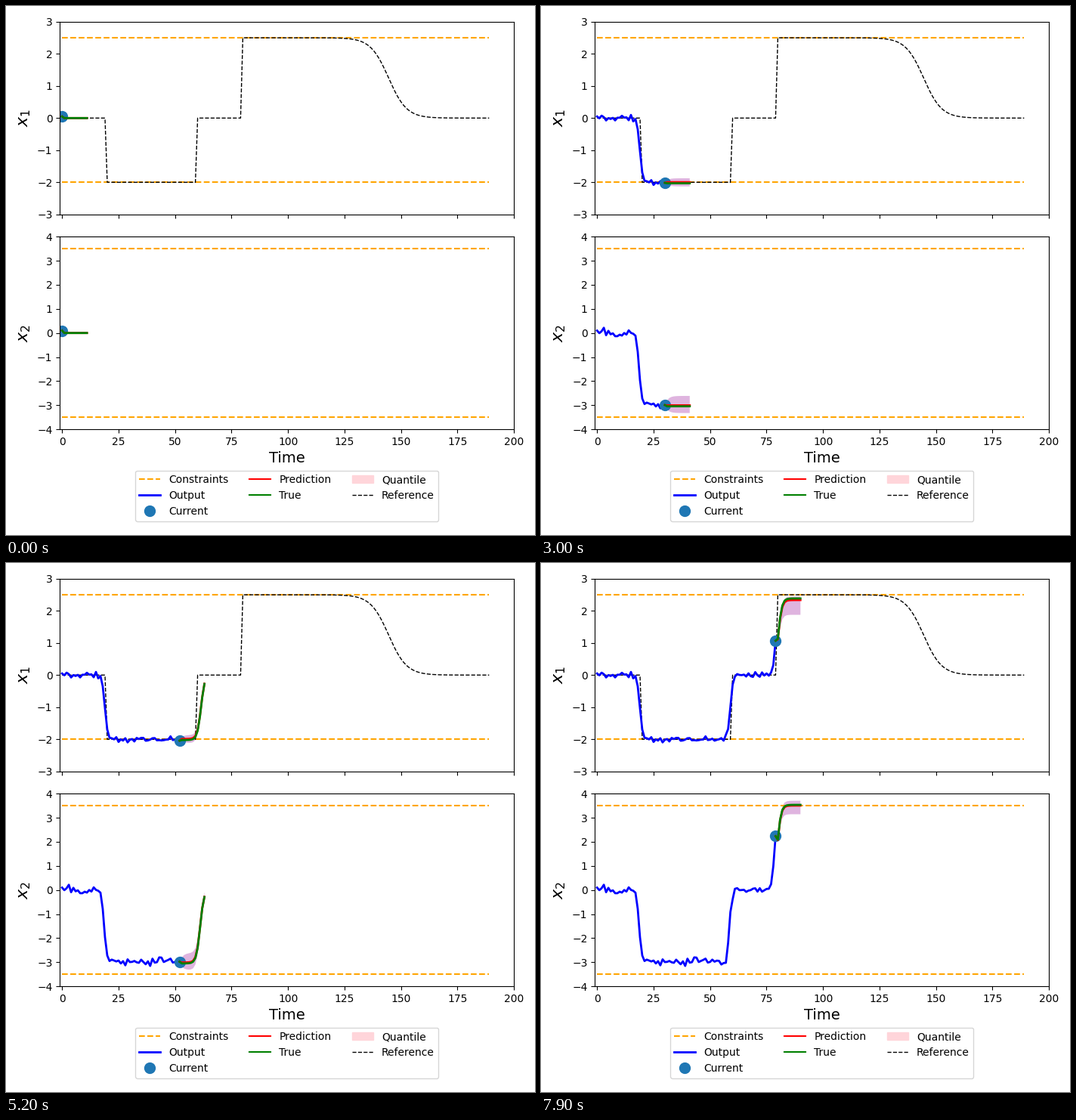
Animation of 700x700 px, one loop 8000 ms. Source, as a matplotlib script:

```python
import numpy as np
import matplotlib.pyplot as plt
from matplotlib.animation import FuncAnimation
from matplotlib.lines import Line2D
from matplotlib.patches import Patch, Polygon

SIZE, DPI = 700, 100
STEPS, HORIZON = 80, 12
SWITCH = (20, 60, 80)          # times at which the set point jumps

plt.rcParams["font.family"] = "DejaVu Sans"
rng = np.random.default_rng(4)


def logistic(v):
    return 1 / (1 + np.exp(-v))


def reference(t):
    fall = 2.5 * logistic(0.25 * (144.5 - t))
    return np.select([t < 20, t < 60, t < 80], [0, -2, 0], fall)


class Panel:
    def __init__(self, fig, top, limits, ylim, label, levels, lead, noise,
                 start, bias, below, above):
        self.levels, self.lead = levels, lead
        self.bias, self.below, self.above = bias, below, above

        # measured output: soft steps just ahead of each switch, plus noise
        t = np.arange(STEPS)
        self.noise = rng.normal(0, noise, STEPS)
        self.noise[0] = start
        self.out = self.noise + sum(
            jump * logistic(1.6 * (t - s + 1 + lead))
            for s, jump in zip(SWITCH, np.diff(levels)))

        ax = self.ax = fig.add_axes([71.2 / SIZE, 1 - (top + 255) / SIZE,
                                     601 / SIZE, 255 / SIZE])
        ax.set(xlim=(-1, 200), ylim=(-ylim, ylim),
               xticks=range(0, 201, 25), yticks=range(-ylim, ylim + 1))
        ax.set_ylabel(label, fontsize=16)
        for y in limits:
            ax.plot([0, 189], [y, y], "--", color="orange", lw=1.5)
        self.band = ax.add_patch(Polygon(np.zeros((3, 2)), fc="#dfb4df",
                                         ec="none", zorder=1))
        line = lambda **kw: ax.plot([], [], zorder=2.2, lw=2, **kw)[0]
        self.trace = line(color="blue")
        self.dot = line(color="C0", marker="o", ms=10, ls="none")
        self.pred = line(color="red")
        self.true = line(color="green")

    def draw(self, t):
        u = np.arange(t, t + HORIZON)
        ahead, now = u[1:], self.out[t]
        warm = min(1, t / 10)

        # predicted steps lag more the further away the switch is
        i = sum(t >= s for s in SWITCH)
        lag = 0.1 + 0.2 * (SWITCH[i] - 1 - t) - self.lead
        share = logistic(1.2 * (ahead - SWITCH[i] - lag))
        p = (self.levels[i] + (self.levels[i + 1] - self.levels[i]) * share
             - 0.3 * self.noise[t] * warm)

        at = lambda values: np.interp(p, sorted(set(self.levels)), values)
        self.trace.set_data(np.arange(t + 1), self.out[:t + 1])
        self.dot.set_data([t], [now])
        self.pred.set_data(u, np.r_[now, p])
        self.true.set_data(u, np.r_[now, p + at(self.bias)])

        # the band opens along the horizon and over the first few steps
        grow = (1 - np.exp((t - ahead) / 1.3)) * warm
        low, high = p - at(self.below) * grow, p + at(self.above) * grow
        self.band.set_xy(np.c_[np.r_[ahead, ahead[::-1]],
                               np.r_[low, high[::-1]]])


fig = plt.figure(figsize=(SIZE / DPI, SIZE / DPI), dpi=DPI, facecolor="white")
# bias and band widths belong to the low, zero and high level
upper = Panel(fig, 20.8, (2.5, -2), 3, "$x_1$", levels=(0, -2, 0, 2.31),
              lead=0, noise=.045, start=.05, bias=(-.035, 0, .05),
              below=(.13, .12, .46), above=(.12, .09, .11))
lower = Panel(fig, 305.2, (3.5, -3.5), 4, "$x_2$", levels=(0, -3, 0, 3.49),
              lead=.4, noise=.09, start=.1, bias=(-.04, 0, .03),
              below=(.32, .2, .36), above=(.39, .17, .2))

time = np.arange(190)
upper.ax.plot(time, reference(time), "k--", lw=1)
upper.ax.tick_params(labelbottom=False)
lower.ax.set_xlabel("Time", fontsize=14)

handles = [
    Line2D([], [], color="orange", ls="--", lw=1.5, label="Constraints"),
    Line2D([], [], color="blue", lw=2, label="Output"),
    Line2D([], [], color="C0", marker="o", ms=10, ls="none", label="Current"),
    Line2D([], [], color="red", lw=1.5, label="Prediction"),
    Line2D([], [], color="green", lw=1.5, label="True"),
    Patch(color="#ffd5da", label="Quantile"),
    Line2D([], [], color="black", ls="--", lw=1, label="Reference"),
]
fig.legend(handles=handles, ncol=3, fontsize=10, loc="upper center",
           bbox_to_anchor=(371.7 / SIZE, 1 - 614.5 / SIZE), borderaxespad=0)


def update(t):
    for panel in (upper, lower):
        panel.draw(t)
    return []


anim = FuncAnimation(fig, update, frames=STEPS, interval=100,
                     repeat=True, repeat_delay=0, blit=False)
plt.show()
```
